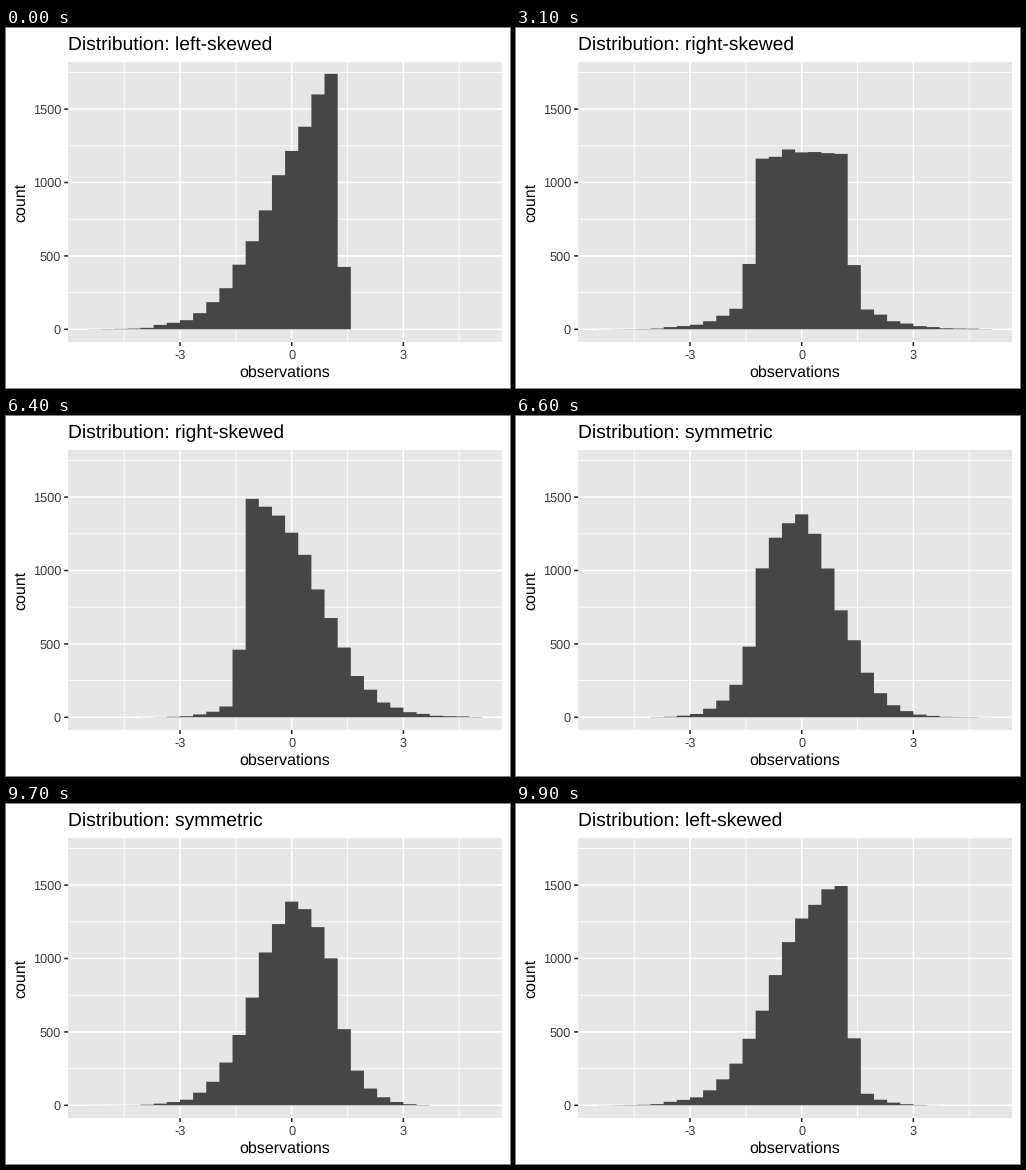
A matplotlib script that plays this animation: 504 by 360 pixels, repeating every 10 s.

```python
import numpy as np
import matplotlib.pyplot as plt
from matplotlib.animation import FuncAnimation
from matplotlib.patches import Rectangle

plt.rcParams["font.family"] = "Liberation Sans"
plt.rcParams["text.hinting"] = "none"

W, H, DPI = 504, 360, 72
FRAMES, STEP = 100, 100
LEFT, RIGHT, TOP, BOTTOM = 62.2, 496, 34, 314
BASE = 301.3
BINS = 30
BAR, PANEL, TEXT, TICK = "#464646", "#e6e6e6", "#3b3b3b", "#242424"
MAJOR, MINOR = 1.55, 0.78


def bins(first, counts):
    out = np.zeros(BINS)
    out[first:first + len(counts)] = counts
    return out


STATES = [
    ("left-skewed", bins(0, [1, 2, 3, 5, 10, 30, 44, 62, 110, 185, 280, 440, 600, 810,
                             1050, 1215, 1380, 1600, 1740, 425])),
    ("right-skewed", bins(11, [450, 1725, 1540, 1400, 1195, 1035, 800, 650, 450, 270,
                               200, 110, 78, 43, 30, 14, 10, 8, 3])),
    ("symmetric", bins(4, [2, 5, 15, 30, 78, 152, 295, 492, 778, 1118, 1296, 1445,
                           1322, 1085, 755, 550, 315, 152, 73, 30, 10, 3])),
]
# first moving step of each transition; each takes four steps
STARTS = [30, 64, 97]
MOVE = 4


def px(x):
    return 285.7 + 37.22 * x


def py(count):
    return BASE - 0.1468 * count


fig = plt.figure(figsize=(W / DPI, H / DPI), dpi=DPI, facecolor="white")
ax = fig.add_axes([0, 0, 1, 1])
ax.set_xlim(0, W)
ax.set_ylim(H, 0)
ax.axis("off")


def line(xs, ys, color, width):
    ax.plot(xs, ys, color=color, lw=width, solid_capstyle="butt", snap=False)


def label(x, y, text, size, color="black", **kw):
    return ax.text(x, y, text, fontsize=size, color=color, va="baseline", **kw)


ax.add_patch(Rectangle((LEFT, TOP), RIGHT - LEFT, BOTTOM - TOP, fc=PANEL, lw=0))

for x in (-4.5, -1.5, 1.5, 4.5):
    line([px(x)] * 2, [TOP, BOTTOM], "white", MINOR)
for y in (250, 750, 1250, 1750):
    line([LEFT, RIGHT], [py(y)] * 2, "white", MINOR)
for x in (-3, 0, 3):
    line([px(x)] * 2, [TOP, BOTTOM], "white", MAJOR)
    line([px(x)] * 2, [BOTTOM, BOTTOM + 4], TICK, MAJOR)
    label(px(x), 330.6, str(x), 12.8, TEXT, ha="center")
for y in (0, 500, 1000, 1500):
    line([LEFT, RIGHT], [py(y)] * 2, "white", MAJOR)
    line([LEFT - 4, LEFT], [py(y)] * 2, TICK, MAJOR)
    label(LEFT - 7.2, py(y) + 4.6, str(y), 12.8, TEXT, ha="right")

label((LEFT + RIGHT) / 2, 348.6, "observations", 16, ha="center")
label(19.6, (TOP + BOTTOM) / 2, "count", 16, ha="center",
      rotation=90, rotation_mode="anchor")
title = label(LEFT, 22, "", 19.2)

pad = (RIGHT - LEFT) / 22
edges = np.linspace(LEFT + pad, RIGHT - pad, BINS + 1)
bars = ax.stairs(py(STATES[0][1]), edges, baseline=BASE, fill=True,
                 color=BAR, lw=0, zorder=3)
bars.set_snap(False)
ax.set_xlim(0, W)
ax.set_ylim(H, 0)


def pose(frame):
    """Label and bin counts at a frame: hold, then a linear blend."""
    name, counts = STATES[0]
    for i, start in enumerate(STARTS):
        t = np.clip((frame - start + 1) / MOVE, 0, 1)
        if t > 0:
            old, new = STATES[i], STATES[(i + 1) % len(STATES)]
            name = new[0] if t >= 0.5 else old[0]
            counts = old[1] + t * (new[1] - old[1])
    return name, counts


def update(frame):
    name, counts = pose(frame)
    title.set_text("Distribution: " + name)
    bars.set_data(values=py(counts))
    return title, bars


anim = FuncAnimation(fig, update, frames=FRAMES, interval=STEP,
                     repeat=True, repeat_delay=0, blit=False)
plt.show()
```
